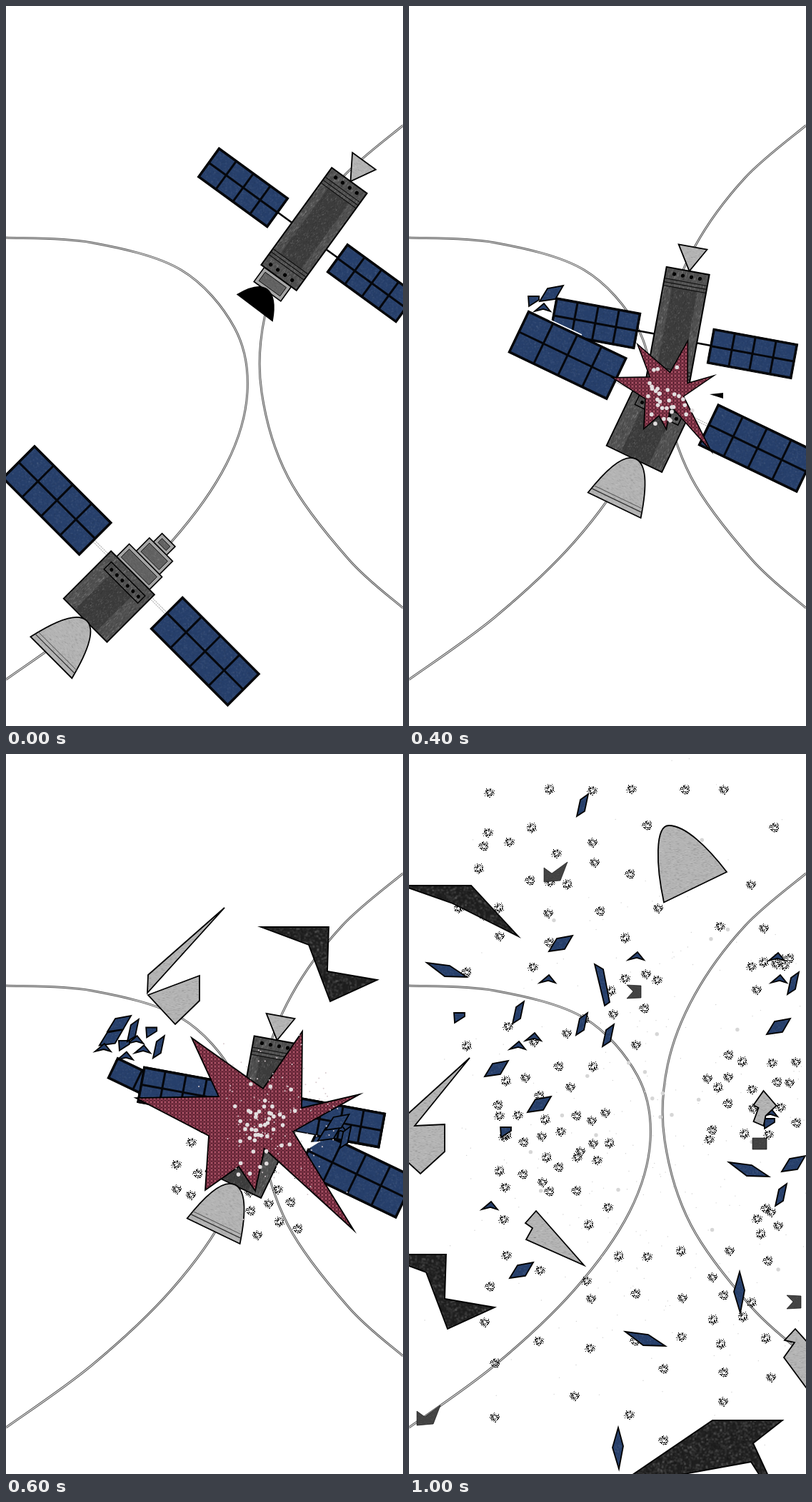
Animation, 556 px wide and 1007 px high, one loop 1200 ms. Source, as an HTML page with a canvas:

```html
<!DOCTYPE html>
<html lang="en">
<head>
<meta charset="utf-8">
<title>Satellite collision</title>
<style>
html, body { margin: 0; width: 100%; height: 100%; overflow: hidden; background: #fff; }
canvas { display: block; }
</style>
</head>
<body>
<canvas id="stage" width="556" height="1007"></canvas>
<script>
const ctx = document.getElementById('stage').getContext('2d');
const STEP = 200;

function rng(seed) {
  return () => {
    seed = (seed * 1664525 + 1013904223) >>> 0;
    return seed / 4294967296;
  };
}

function tile(size, paint) {
  const c = document.createElement('canvas');
  c.width = c.height = size;
  paint(c.getContext('2d'));
  return c;
}

// Fabric-like fill: a base colour with faint light and dark flecks.
function grain(base, amp, w, h) {
  const r = rng(w * 31 + h * 7);
  return ctx.createPattern(tile(96, g => {
    g.fillStyle = base;
    g.fillRect(0, 0, 96, 96);
    for (let i = 0; i < 2600; i++) {
      const v = r() < .5 ? 0 : 255;
      g.fillStyle = `rgba(${v},${v},${v},${r() * amp})`;
      g.fillRect(r() * 96 | 0, r() * 96 | 0, w, h);
    }
  }), 'repeat');
}

const fills = {
  body: grain('#505050', .15, 1, 3),
  core: grain('#3c3c3c', .12, 1, 2),
  box: grain('#a6a6a6', .06, 2, 1),
  inset: grain('#626262', .08, 2, 1),
  grey: grain('#b4b4b4', .08, 3, 1),
  black: grain('#1f1f1f', .07, 3, 3),
  blue: grain('#263f6b', .04, 2, 2),
  dark: grain('#434343', .04, 2, 1),
  red: ctx.createPattern(tile(5, g => {
    g.fillStyle = '#853549';
    g.fillRect(0, 0, 5, 5);
    g.fillStyle = '#4a1c29';
    g.fillRect(0, 0, 1, 4);
    g.fillRect(2, 4, 2, 1);
    g.fillStyle = '#a05062';
    g.fillRect(2, 1, 2, 2);
  }), 'repeat')
};

function poly(pts, fill, line = 1.8, x = 0, y = 0) {
  ctx.beginPath();
  for (let i = 0; i < pts.length; i += 2) ctx.lineTo(pts[i] + x, pts[i + 1] + y);
  ctx.closePath();
  ctx.fillStyle = fill;
  ctx.fill();
  if (line) {
    ctx.lineWidth = line;
    ctx.strokeStyle = '#000';
    ctx.stroke();
  }
}

function rect(x0, y0, x1, y1, fill, line) {
  poly([x0, y0, x1, y0, x1, y1, x0, y1], fill, line);
}

function seg(x0, y0, x1, y1, color, width) {
  ctx.beginPath();
  ctx.moveTo(x0, y0);
  ctx.lineTo(x1, y1);
  ctx.strokeStyle = color;
  ctx.lineWidth = width;
  ctx.stroke();
}

function dot(x, y, r, color) {
  ctx.beginPath();
  ctx.arc(x, y, r, 0, 7);
  ctx.fillStyle = color;
  ctx.fill();
}

function outline(path, fill) {
  ctx.fillStyle = fill;
  ctx.fill(path);
  ctx.strokeStyle = '#000';
  ctx.lineWidth = 1.8;
  ctx.stroke(path);
}

function at([x, y, deg], draw) {
  ctx.save();
  ctx.translate(x, y);
  ctx.rotate(deg * Math.PI / 180);
  draw();
  ctx.restore();
}

// Smooth curve through points.
function spline(p) {
  const path = new Path2D(), n = p.length / 2;
  const q = i => { i = Math.max(0, Math.min(n - 1, i)); return [p[2 * i], p[2 * i + 1]]; };
  path.moveTo(...q(0));
  for (let i = 0; i < n - 1; i++) {
    const [a, b, c, d] = [q(i - 1), q(i), q(i + 1), q(i + 2)];
    path.bezierCurveTo(b[0] + (c[0] - a[0]) / 6, b[1] + (c[1] - a[1]) / 6,
      c[0] - (d[0] - b[0]) / 6, c[1] - (d[1] - b[1]) / 6, c[0], c[1]);
  }
  return path;
}

const orbits = [
  [0, 324, 120, 331, 245, 369, 320, 450, 338, 540, 309, 640, 232, 749, 120, 855, 0, 942],
  [556, 167, 470, 241, 400, 337, 362, 436, 358, 540, 395, 659, 480, 774, 556, 842]
].map(spline);

function drawOrbits() {
  for (const o of orbits) {
    ctx.lineWidth = 3;
    ctx.strokeStyle = '#555';
    ctx.stroke(o);
    ctx.lineWidth = 1.1;
    ctx.strokeStyle = '#dcdcdc';
    ctx.stroke(o);
  }
}

function panel(x0, y0, x1, y1, rows = 2) {
  rect(x0, y0, x1, y1, '#05070c', 1);
  const w = (x1 - x0 - 3) / 4, h = (y1 - y0 - 3) / rows;
  ctx.fillStyle = fills.blue;
  for (let i = 0; i < 4; i++)
    for (let j = 0; j < rows; j++) ctx.fillRect(x0 + 3 + i * w, y0 + 3 + j * h, w - 3, h - 3);
}

function box(x0, y0, x1, y1) {
  rect(x0, y0, x1, y1, fills.box, 1.6);
  rect(x0 + 5, y0 + 5, x1 - 5, y1 - 5, fills.inset, .8);
}

const bowl = new Path2D('M-33,137 Q-20,107 -4,107 Q13,107 28,138 Z');
const nozzle = new Path2D('M-38,117.5 Q-22,46 2,46 Q26,46 44,117.5 Z');

function wingsA() {
  seg(-56, 11, -30, 11, '#000', 2.5);
  seg(30, 13, 52, 13, '#000', 2.5);
  panel(-175, -14, -54, 37);
  panel(49.5, -11, 170, 38.5);
}

function satA(whole) {
  wingsA();
  poly([-19.5, -118, 21, -118, 2, -84], fills.grey);
  if (whole) {
    box(-25, 84, 21.5, 109);
    outline(bowl, '#000');
  }
  rect(-30.5, -84, 30.5, 84, fills.body, 2);
  rect(-18, -58, 18, 56, fills.core, 0);
  for (let i = 0; i < 3; i++) {
    seg(-30, i * 5 - 68, 30, i * 5 - 68, '#111', 1.2);
    seg(-30, i * 5 + 56, 30, i * 5 + 56, '#111', 1.2);
  }
  for (let i = 0; i < 4; i++) {
    dot(-18 + i * 12.2, -76, 2.6, '#000');
    dot(-20 + i * 12.4, 76, 2.6, '#000');
  }
}

function satB(whole, rows) {
  ctx.setLineDash([2, 1]);
  for (const y of [-41.5, -38.5]) {
    seg(-70, y, -42, y, '#aaa', 1);
    seg(42, y, 74, y, '#aaa', 1);
  }
  ctx.setLineDash([]);
  panel(-223.5, -11 - 32.5 * rows, -70, -11, rows);
  panel(72.5, -73, 226, -9);
  if (whole) {
    box(-10, -115, 16, -97);
    box(-18, -98, 28, -71);
    box(-32, -72, 33, -46);
  }
  rect(-43, -47, 43, 47, fills.body, 1.8);
  rect(-21, -22, 22, 46, fills.core, 0);
  rect(-32, -36.5, 35, -22, fills.body, 1.4);
  for (let i = 0; i < 6; i++) dot(-24 + i * 10.6, -29, 2.5, '#000');
  outline(nozzle, fills.grey);
  seg(-36, 110, 42, 110, '#333', 1.2);
  seg(-35, 105, 41, 105, '#555', 1);
}

const posesA = [[431.5, 312, 36], [380, 400, 10.2], [375.5, 453, 10.4], [362.5, 482.5, 10.4]];
const posesB = [[144.3, 826, 45], [278, 685.5, 28.6], [335.7, 591, 25.6], [338.7, 560, 25.6]];

const burst = [260, 397, 360, 468, 415, 388, 414, 495, 495, 476, 402, 528, 487, 666,
  362, 552, 349, 611, 326, 577, 279, 610, 284, 534, 182, 481, 298, 479];
const smallBurst = burst.map((v, i) => i % 2 ? 473 + (v - 397) * .557 : 320 + (v - 260) * .455);

// Soft cloud of dots around a centre.
function cloud(x, y, sx, sy, n, r, color) {
  const q = rng(n * 13 + sx), g = () => q() + q() + q() - 1.5;
  for (let i = 0; i < n; i++) dot(x + g() * sx, y + g() * sy, r, color);
}

// Puff: a ragged ring of soot specks.
const puffs = [1, 2, 3, 4].map(seed => tile(18, g => {
  const r = rng(seed * 977);
  for (let i = 0; i < 110; i++) {
    const a = r() * 6.283, d = 4.6 + (r() + r() - 1) * 3.2;
    g.fillStyle = r() < .6 ? '#111' : '#777';
    g.fillRect(9 + d * Math.cos(a) | 0, 9 + d * Math.sin(a) | 0, 1, 1);
  }
}));

// Spread n puffs over a region, each at the roomiest of a few random spots.
function puffField(x0, y0, x1, y1, n) {
  const r = rng(x0 * 7 + y0), spots = [];
  const room = (x, y) => Math.min(1e4, ...spots.map(s => Math.hypot(s[0] - x, s[1] - y)));
  while (spots.length < n) {
    let best, most = -1;
    for (let k = 0; k < 5; k++) {
      const x = x0 + r() * (x1 - x0) | 0, y = y0 + r() * (y1 - y0) | 0, d = room(x, y);
      if (d > most) [best, most] = [[x, y], d];
    }
    spots.push(best);
  }
  spots.forEach(([x, y], i) => ctx.drawImage(puffs[i % 4], x - 9, y - 9));
}

const regions = {
  hit: [[236, 515, 278, 628, 6], [338, 580, 420, 680, 11]],
  still: [[65, 42, 515, 272, 25], [80, 295, 500, 430, 7], [105, 490, 295, 660, 10],
    [105, 690, 512, 770, 15], [105, 780, 512, 962, 20]],
  near: [[235, 380, 330, 630, 20], [335, 435, 475, 640, 40], [268, 640, 350, 705, 7]],
  far: [[105, 120, 265, 245, 8], [120, 360, 265, 612, 28], [280, 295, 335, 380, 5],
    [475, 285, 537, 298, 6], [410, 430, 550, 540, 18], [480, 635, 528, 675, 5]]
};
const drawPuffs = name => regions[name].forEach(a => puffField(...a));

const chips = {
  P: [-3, -7, 8, -15, 3, 9, -8, 16],
  R: [-16, 11, -5, -7, 17, -11, 6, 8],
  C: [-11, 5, 2, -6, 11, 5, 1, 2],
  T: [-7, -6, 8, -6, 8, -1, -6, 8],
  K: [0, -29, 7, -3, 1, 29, -8, -1],
  W: [-29, -12, 3, -8, 27, 8, -4, 7],
  V: [-10, -29, 2, -22, 11, 24, 4, 29],
  D: [-16, -7, -5, 1, 17, -15, 7, 11, -16, 13],
  E: [-11, -10, 9, -9, 9, 8, -11, 9, -2, -1],
  S: [-10, -8, 10, -8, 10, 8, -10, 8]
};

function chip(k, x, y) {
  const steel = 'DES'.includes(k);
  poly(chips[k], steel ? fills.dark : fills.blue, steel ? .6 : 1.8, x, y);
}

// A handful of panel chips around a point.
function chipCloud(x, y, sx, sy, kinds) {
  const r = rng(x);
  [...kinds].forEach((k, i) => {
    const a = i * 2.4, d = Math.sqrt((i + r() * .5) / kinds.length);
    chip(k, x + sx * d * Math.cos(a), y + sy * d * Math.sin(a));
  });
}

const resting = {
  P: [153, 361, 279, 393, 521, 616], R: [122, 440, 517, 381, 538, 573, 157, 722],
  C: [194, 315, 318, 283, 152, 408, 174, 396, 113, 632], T: [70, 368, 135, 528],
  K: [463, 753, 293, 971], W: [332, 820], E: [540, 767]
};

// Kind, place after the blast, flight during the last step.
const flying = [
  ['P', 341, 517, 197, -197], ['P', 384, 555, -141, -484], ['P', 317, 625, -75, -248],
  ['R', 221, 490, -39, 0], ['R', 357, 576, -145, -311], ['V', 300, 567, -30, -244],
  ['W', 332, 552, -278, -248], ['W', 383, 610, 94, -27], ['C', 466, 497, 49, -213],
  ['C', 360, 518, 158, -203], ['C', 437, 527, 68, -25], ['T', 435, 543, 69, -27],
  ['D', 130, 690, -103, 236], ['D', 392, 427, -187, -261], ['E', 324, 611, -8, -278],
  ['S', 422, 572, 69, -27]
];

const hook = [357, 242, 452, 242, 450, 304, 520, 316, 454, 346, 424, 267];
const cap = new Path2D('M374,395.500 C363,345 361,288 381,288 C404,288 435,318 462,353 Z');

// Outline, fill, flight during the last step.
const shards = [
  [[267, 328, 190, 423, 232, 421, 232, 459, 198, 490, 160, 455, 160, 425], 'grey', -182, 97],
  [[162, 265, 259, 265, 325, 336, 233, 290], 'black', -172, -81],
  [hook.map((v, i) => v + (i % 2 ? 351 : -242)), 'black', -158, 107],
  [[267, 564, 334, 640, 253, 604, 262, 588, 252, 581], 'grey', -89, 75],
  [[363, 640, 381, 660, 445, 631, 430, 714, 384, 730, 347, 680, 362, 659, 348, 656], 'grey', 178, 164],
  [[187, 955, 233, 939, 268, 990, 250, 1040, 175, 1015], 'grey', 0, 200],
  [[570, 102, 535, 132, 535, 155, 570, 197], 'grey', 100, 0],
  [[264, 859, 376, 783, 474, 783, 433, 815, 486, 929, 430, 841, 326, 860], 'black', 49, 149],
  [[428, 497, 446, 518, 431, 532, 428, 546, 414, 540, 421, 521, 414, 517], 'grey', 68.5, -26]
];

function approach(i) {
  at(posesA[i], () => satA(true));
  at(posesB[i], () => satB(true, 2));
}

function impact() {
  at(posesA[2], () => satA(false));
  at(posesB[2], () => satB(false, 2));
  seg(197, 439, 242, 460, '#fff', 1.6);
  chip('T', 174, 412);
  chip('R', 199, 402);
  chip('C', 187, 422);
  poly([421, 543, 440, 541, 440, 549], '#000', 0);
  poly(smallBurst, fills.red, 1.5);
  cloud(358, 551, 32, 32, 32, 2.8, '#e3dfe0');
}

function blast() {
  drawPuffs('hit');
  at(posesA[3], () => satA(false));
  at(posesB[3], () => satB(false, 1));
  at(posesA[3], wingsA);
  poly([404, 528, 432, 533, 424, 543, 440, 542, 424, 552], '#fff', 0);
  chipCloud(176, 400, 45, 30, 'CTPCRTCRPC');
  chipCloud(462, 525, 24, 14, 'CRRP');
  poly(burst, fills.red);
  cloud(356, 522, 45, 52, 46, 2.8, '#e3dfe0');
  cloud(370, 515, 95, 100, 110, 1, '#d8ccd0');
  poly([306, 215, 199, 309, 198, 334], fills.grey);
  poly([199, 337, 271, 310, 271, 345, 237, 378], fills.grey);
  poly(hook, fills.black);
}

// k is 0 just after the blast and 1 when the pieces have flown apart.
function debris(k) {
  cloud(360, 540, 170 + 150 * k, 320 + 100 * k, 300, .7, '#d2d2d2');
  cloud(357 - 27 * k, 530 - 100 * k, 62 + 150 * k, 70 + 250 * k, 90 - 65 * k, 2.7, '#d6d6d6');
  drawPuffs('still');
  drawPuffs(k ? 'far' : 'near');
  for (const kind in resting)
    for (let i = 0; i < resting[kind].length; i += 2) chip(kind, resting[kind][i], resting[kind][i + 1]);
  for (const [kind, x, y, dx, dy] of flying) chip(kind, x + dx * k, y + dy * k);
  if (!k) cloud(350, 552, 45, 35, 14, 2, '#d5dae2');
  for (const [pts, fill, dx, dy] of shards) poly(pts, fills[fill], 1.8, dx * k, dy * k);
  at([-17 * k, -188 * k, 0], () => outline(cap, fills.grey));
}

const scenes = [() => approach(0), () => approach(1), impact, blast, () => debris(0), () => debris(1)];
const start = performance.now();
let shown = -1;

function tick() {
  const step = Math.floor((performance.now() - start) / STEP) % scenes.length;
  if (step !== shown) {
    shown = step;
    ctx.fillStyle = '#fff';
    ctx.fillRect(0, 0, 556, 1007);
    drawOrbits();
    scenes[step]();
  }
  requestAnimationFrame(tick);
}
tick();
</script>
</body>
</html>
```
